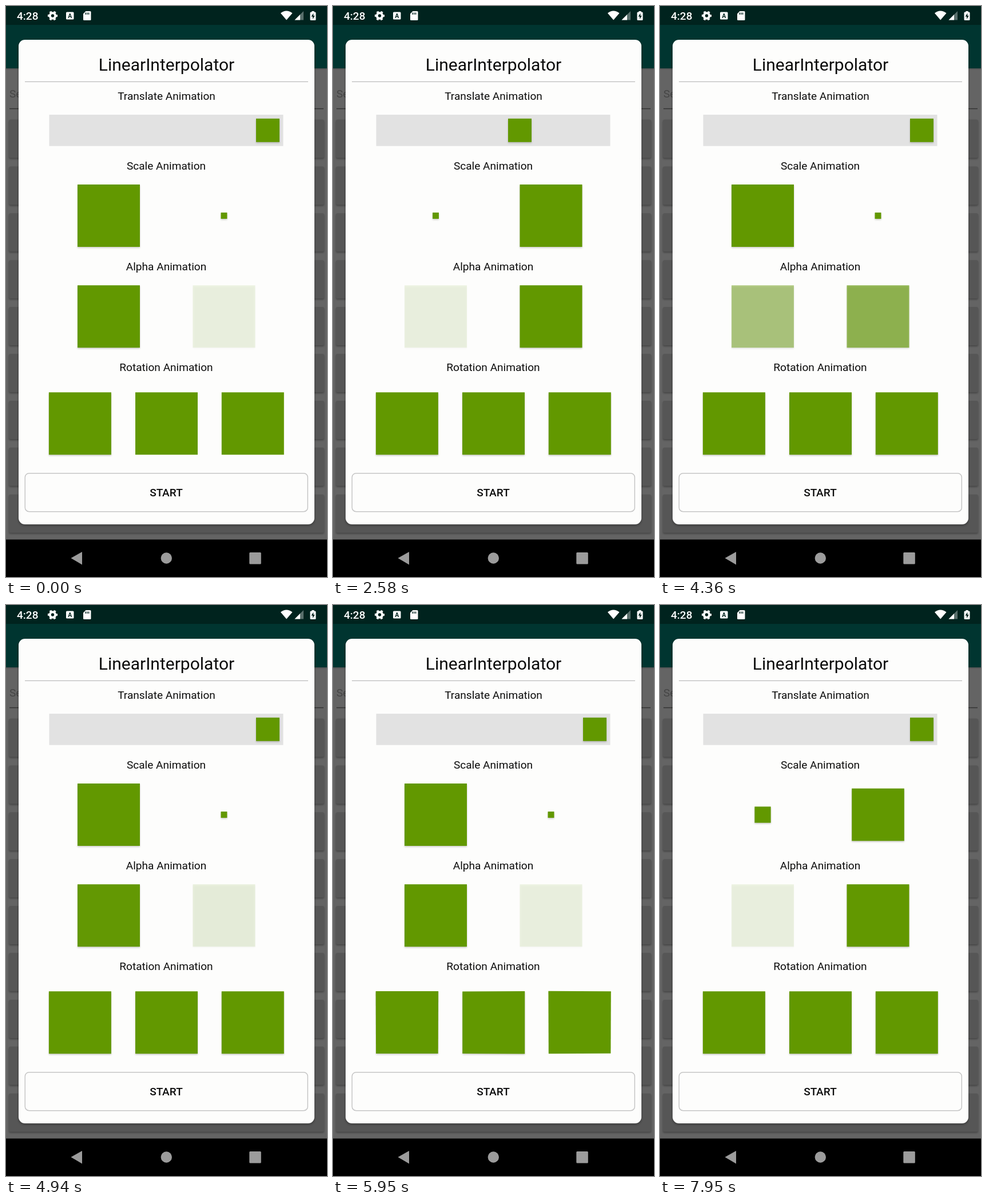
An HTML page that plays this animation: 561x998 px, repeating every 7990 ms.

```html
<!DOCTYPE html>
<html lang="en">
<head>
<meta charset="utf-8">
<title>Interpolator demo</title>
<style>
  html, body { margin: 0; width: 100%; height: 100%; overflow: hidden; background: #000; }
  svg { display: block; width: 100vw; height: 100vh; font-family: Roboto, sans-serif; }
  .label { font-size: 19.09px; text-anchor: middle; fill: #0c0c0c; }
  .medium { font-weight: 500; }
</style>
</head>
<body>
<svg viewBox="0 0 561 998">
  <defs>
    <filter id="blur" x="-30%" y="-30%" width="160%" height="160%"><feGaussianBlur stdDeviation="1.4"/></filter>
    <clipPath id="stage"><rect x="33" y="664.5" width="495" height="131"/></clipPath>
    <linearGradient id="toRight"><stop offset="0" stop-opacity=".01"/><stop offset="1" stop-opacity=".16"/></linearGradient>
    <linearGradient id="toLeft"><stop offset="0" stop-opacity=".14"/><stop offset="1" stop-opacity="0"/></linearGradient>
  </defs>

  <rect width="561" height="998" fill="#646464"/>
  <rect width="561" height="109" fill="#003530"/>
  <rect width="561" height="33" fill="#00231e"/>
  <rect y="109" width="561" height="2" opacity=".12"/>
  <text x="6" y="159.500" font-size="19.09" fill="#454545">Search</text>
  <path d="M6 179.500H555" stroke="#343434" stroke-width="1.300"/>
  <g id="list"></g>

  <text class="medium" x="19" y="23.700" font-size="19" fill="#fff">4:28</text>
  <g fill="#fff">
    <circle cx="81.500" cy="17" r="4.700" fill="none" stroke="#fff" stroke-width="4"/>
    <circle cx="81.500" cy="17" r="7.300" fill="none" stroke="#fff" stroke-width="2.600" stroke-dasharray="3.820" stroke-dashoffset="1.910"/>
    <rect x="105" y="10.500" width="13.500" height="13" rx="1.500"/>
    <path d="M139.500 9H147q1.500 0 1.500 1.500V23.500Q148.500 25 147 25H136.500Q135 25 135 23.500V13.500Z"/>
    <path d="M480 12.500Q490 4.500 500.500 12.500L490.200 24.500Z"/>
    <path d="M520 9V24.500H504.500Z" opacity=".35"/>
    <path d="M514 15V24.500H504.500Z"/>
    <path d="M534.500 10.500V9H538.500V10.500H540Q541.500 10.500 541.500 12V23.500Q541.500 25 540 25H533Q531.500 25 531.500 23.500V12Q531.500 10.500 533 10.500Z"/>
  </g>
  <path d="M139 11.500v3.500M141.800 11.500v3.500M144.600 11.500v3.500" stroke="#00231e" stroke-width="1.400"/>
  <path d="M537.300 12.500L533.500 18.500H536V23L539.700 17H537.300Z" fill="#00231e"/>
  <text x="111.750" y="20.800" font-size="10.500" font-weight="700" text-anchor="middle" fill="#00231e">A</text>

  <rect y="932.500" width="561" height="66"/>
  <g fill="#9c9c9c">
    <path d="M113.500 965L133 954V976.500Z"/>
    <circle cx="280.300" cy="965" r="9.700"/>
    <rect x="425.300" y="955" width="20.500" height="20.500" rx="1.500"/>
  </g>

  <rect x="21" y="60" width="519" height="849" rx="12" opacity=".2" filter="url(#blur)"/>
  <rect x="22" y="59" width="517" height="847" rx="11" fill="#fdfdfc"/>
  <text x="280.500" y="112.500" font-size="30" text-anchor="middle" fill="#0c0c0c">LinearInterpolator</text>
  <path d="M33 132.300H528" stroke="#bdbdbd" stroke-width="1.300"/>
  <text class="label" x="280.500" y="163.700">Translate Animation</text>
  <text class="label" x="280" y="285.700">Scale Animation</text>
  <text class="label" x="280" y="462">Alpha Animation</text>
  <text class="label" x="280" y="638.300">Rotation Animation</text>
  <rect x="75.500" y="190" width="409" height="54.700" fill="#e2e2e2"/>
  <rect x="33.300" y="816.700" width="494" height="67" rx="7" fill="none" stroke="#c6c6c6" stroke-width="1.500"/>
  <text class="label medium" x="280" y="857.300">START</text>

  <g id="boxes"></g>
  <g clip-path="url(#stage)">
    <g id="cast">
      <path d="M33 664H112L73 796H33Z" fill="url(#toRight)"/>
      <path d="M166 664H225L245 796H169Z" fill="url(#toLeft)"/>
      <path d="M75 791H167V796H73Z" opacity=".22"/>
      <path d="M238 664H275V796H226Z" fill="url(#toRight)" opacity=".5"/>
      <path d="M284 680L322 796H284Z" fill="url(#toLeft)" opacity=".5"/>
      <path d="M285 748L303 796H280Z" opacity=".2"/>
      <path d="M427 664H450L480 785L445 747L438 796Z" fill="url(#toLeft)" opacity=".75"/>
      <path d="M445 747L484.500 796H437Z" opacity=".18"/>
      <path d="M445 747L459 796M445 747L470 796" stroke="#fff" stroke-opacity=".6"/>
    </g>
    <g id="turns"></g>
  </g>
</svg>
<script>
const LOOP = 7990, GREEN = '#629800';
const HALF = 54.5, CAMERA = 224.4;
const $ = id => document.getElementById(id);

function add(parent, tag, attrs) {
  const el = document.createElementNS('http://www.w3.org/2000/svg', tag);
  set(el, attrs);
  parent.appendChild(el);
  return el;
}
function set(el, attrs) {
  for (const key in attrs) el.setAttribute(key, attrs[key]);
}

for (let i = 0; i < 9; i++) {
  const y = 198.5 + 81.9 * i;
  add($('list'), 'rect', { x: 5, y: y + 2, width: 551, height: 67, rx: 3, opacity: .3, filter: 'url(#blur)' });
  add($('list'), 'rect', { x: 5, y, width: 551, height: 67, rx: 3, fill: '#565656' });
}

// A green square with a soft shadow just below it.
function makeBox() {
  const shadow = add($('boxes'), 'rect', { filter: 'url(#blur)' });
  const face = add($('boxes'), 'rect', { fill: GREEN });
  return (cx, cy, size, alpha = 1) => {
    const x = cx - size / 2, y = cy - size / 2;
    set(shadow, { x, y: y + 1.7, width: size, height: size, opacity: .2 * alpha });
    set(face, { x, y, width: size, height: size, opacity: alpha });
  };
}
const slider = makeBox(), grow = makeBox(), shrink = makeBox(), fadeIn = makeBox(), fadeOut = makeBox();

// A square turned about the x and/or y axis, seen in perspective.
function makeTurn(cx, aboutX, aboutY) {
  const cy = 729.7;
  const shadow = add($('turns'), 'polygon', { filter: 'url(#blur)', transform: 'translate(0 1.7)' });
  const face = add($('turns'), 'polygon', { fill: GREEN });
  return (angle, shadowAlpha) => {
    const a = aboutX * angle, b = aboutY * angle;
    const points = [[-1, -1], [1, -1], [1, 1], [-1, 1]].map(([sx, sy]) => {
      const x = sx * HALF, y = sy * HALF, depth = -x * Math.sin(b);
      const z = y * Math.sin(a) + depth * Math.cos(a);
      const k = CAMERA / (CAMERA - z);
      return [cx + k * x * Math.cos(b), cy + k * (y * Math.cos(a) - depth * Math.sin(a))];
    }).join(' ');
    set(shadow, { points, opacity: shadowAlpha });
    set(face, { points });
  };
}
const turnX = makeTurn(129.4, 1, 0), turnY = makeTurn(280.5, 0, 1), turnXY = makeTurn(431.3, 1, 1);

// Start times of each stage; before the first run everything is at its end.
const RUNS = [
  { reset: 1910, slide: 1950, scale: 2976, fade: 3960, turn: 4945 },
  { reset: 6710, slide: 6750, scale: 7774, fade: 8760, turn: 9745 }
];
const progress = (t, start, duration = 1000) => Math.min(1, Math.max(0, (t - start) / duration));

function draw(t) {
  const run = RUNS.filter(r => t >= r.reset).pop();
  const at = (stage, duration) => run ? progress(t, run[stage], duration) : 1;
  const slide = at('slide'), scale = .9 * at('scale'), fade = .9 * at('fade');
  // The turn comes to rest a touch short of half a revolution.
  const turn = run ? Math.min(.995, at('turn', 1010)) : 1;

  slider(102.5 + 355 * slide, 217.3, 41);
  grow(179.5, 366.5, 109 * (.1 + scale));
  shrink(381, 366.5, 109 * (1 - scale));
  fadeIn(179.5, 542.7, 109, .1 + fade);
  fadeOut(381, 542.7, 109, 1 - fade);

  const angle = Math.PI * turn, tilt = Math.sin(angle);
  const soft = .2 * (1 - tilt);
  turnX(angle, soft);
  turnY(angle, turn < 1 ? soft : 0);
  turnXY(angle, turn < .5 ? soft : 0);
  set($('cast'), { opacity: Math.max(0, tilt) ** 6 });
}

const begin = performance.now();
function tick() {
  draw((performance.now() - begin) % LOOP);
  requestAnimationFrame(tick);
}
tick();
</script>
</body>
</html>
```
